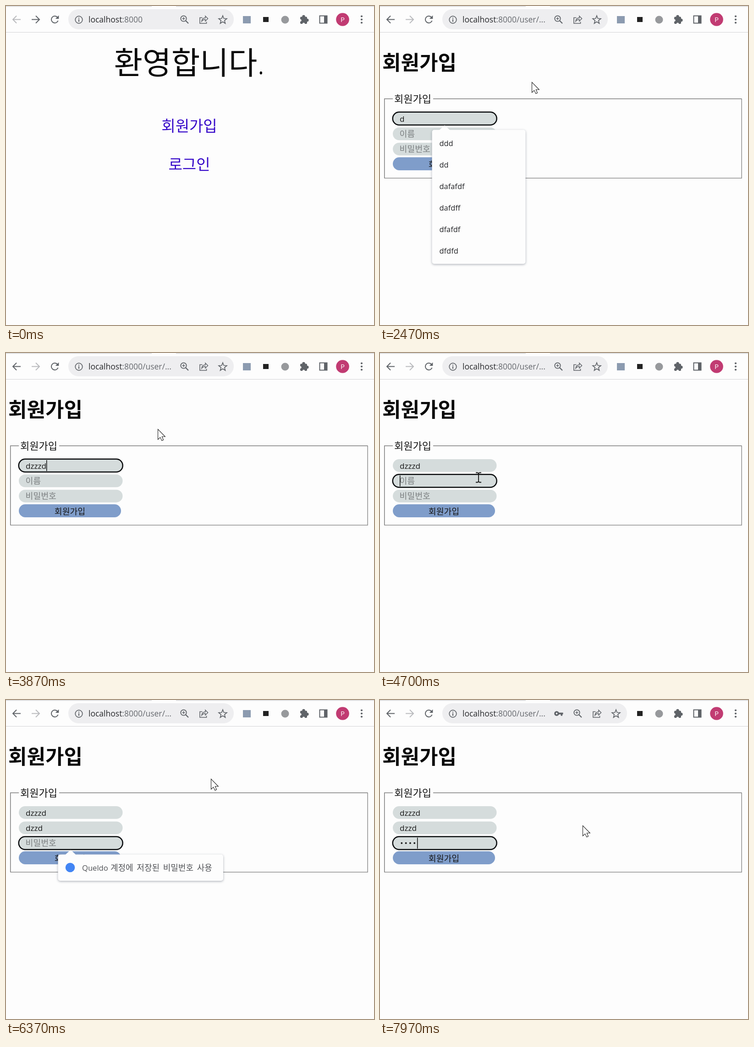
An HTML page with a canvas that plays this animation: 803x697 px, repeating every 8 s.

```html
<!DOCTYPE html>
<html lang="ko">
<head>
<meta charset="utf-8">
<title>회원가입</title>
<style>
  html, body { margin: 0; width: 100%; height: 100%; overflow: hidden; background: #fdfdfd; }
  canvas { display: block; }
</style>
</head>
<body>
<canvas id="stage" width="803" height="697"></canvas>
<script>
const ctx = document.getElementById('stage').getContext('2d');
const LOOP = 8000;
const FONT = '"Open Sans", "Noto Sans CJK KR", "Noto Sans CJK", sans-serif';
const PAPER = '#fdfdfd', ICON = '#5f6368', INK = '#151515';

const NAVIGATE = 600;
const LIST = [1400, 2700];
const ACCOUNT = [5900, 6900];
const fields = [
  { y: 232, hint: '아이디', text: 'dzzzd', focus: 1300, keys: [1850, 2700, 2950, 3200, 3500] },
  { y: 265.5, hint: '이름', text: 'dzzd', focus: 4700, keys: [4850, 5000, 5150, 5300] },
  { y: 298.7, hint: '비밀번호', dots: true, focus: 5800, keys: [6900, 7100, 7300, 7500] }
];
// time, x, y
const pointer = [
  [60, 420, 720], [420, 398, 268], [620, 398, 268], [830, 395, 302],
  [900, 395, 302], [1250, 215, 246], [1400, 215, 246], [1750, 331, 166],
  [4250, 331, 166], [4650, 215, 272], [5350, 215, 272], [5750, 215, 312],
  [5900, 215, 312], [6250, 447, 172], [7300, 447, 172], [7750, 442, 274]
];

const within = (t, [from, to]) => t >= from && t < to;

function text(str, x, y, size, color = INK, weight = 400, align = 'left') {
  ctx.font = `${weight} ${size}px ${FONT}`;
  ctx.textAlign = align;
  ctx.fillStyle = color;
  ctx.fillText(str, x, y);
  return ctx.measureText(str).width;
}

function rect(x, y, w, h, color) {
  ctx.fillStyle = color;
  ctx.fillRect(x, y, w, h);
}

function pill(x, y, w, h, color, r = h / 2) {
  ctx.beginPath();
  ctx.roundRect(x, y, w, h, r);
  ctx.fillStyle = color;
  ctx.fill();
}

function disc(x, y, r, color) {
  ctx.beginPath();
  ctx.arc(x, y, r, 0, 7);
  ctx.fillStyle = color;
  ctx.fill();
}

function ring(x, y, r, width, from = 0, to = Math.PI * 2) {
  ctx.beginPath();
  ctx.arc(x, y, r, from, to);
  ctx.lineWidth = width;
  ctx.strokeStyle = ICON;
  ctx.stroke();
}

// Path given relative to (x, y)
function shape(d, x, y, { fill, stroke, width = 2 }) {
  const path = new Path2D(d);
  ctx.save();
  ctx.translate(x, y);
  if (fill) { ctx.fillStyle = fill; ctx.fill(path); }
  if (stroke) { ctx.strokeStyle = stroke; ctx.lineWidth = width; ctx.stroke(path); }
  ctx.restore();
}

const line = (d, x, y, color = ICON, width = 2) => shape(d, x, y, { stroke: color, width });

function star(x, y) {
  ctx.beginPath();
  for (let i = 0; i < 10; i++) {
    const r = i % 2 ? 4 : 9.3, a = i * Math.PI / 5 - Math.PI / 2;
    ctx.lineTo(x + r * Math.cos(a), y + 1 + r * Math.sin(a));
  }
  ctx.closePath();
  ctx.strokeStyle = ICON;
  ctx.lineWidth = 1.7;
  ctx.stroke();
}

function zoom(x, y) {
  ring(x - 2, y - 2, 6.2, 1.8);
  line('M2.5 2.5L8.5 8.5', x, y, ICON, 2.2);
  line('M-5-2H1M-2-5V1', x, y, ICON, 1.6);
}

function share(x, y) {
  line('M-3-4H-8.5V8.5H6V5', x, y, ICON, 1.6);
  line('M-4.5 4C-4-1-1-3.5 3.5-3.5V-7.5L9-2 3.5 3.5V0C0 0-2.5 1-4.5 4z', x, y, ICON, 1.5);
}

function key(x, y) {
  ring(x - 4.5, y, 3.6, 3.4);
  rect(x, y - 1.9, 9.5, 3.8, ICON);
  rect(x + 4.5, y, 3.5, 5, ICON);
}

function puzzle(x, y) {
  pill(x - 9, y - 6, 15, 15.5, ICON, 2);
  disc(x - 1.5, y - 6.5, 3.2, ICON);
  disc(x + 6.3, y + 1.5, 3.2, ICON);
  disc(x - 9, y + 1.8, 2.6, PAPER);
  disc(x - 1.5, y + 9.5, 2.6, PAPER);
}

function toolbar(onForm, hasKey) {
  rect(0, 0, 803, 57, PAPER);
  rect(0, 0, 318, 1.6, '#dadbde');
  rect(371, 0, 432, 1.6, '#dadbde');
  rect(0, 57, 803, 1, '#d3d3d5');

  const dim = '#b9babd';
  line('M9 0H-7.5M0-8L-8 0 0 8', 23, 29.5, onForm ? ICON : dim);
  line('M-9 0H7.5M0-8L8 0 0 8', 65, 29.5, onForm ? dim : ICON);
  ring(106.5, 29.5, 7.5, 2, 0.35, 5.5);
  shape('M8.8-9V-1.5H1.3z', 106.5, 29.5, { fill: ICON });

  pill(136, 7, hasKey ? 403 : 361, 44, '#eeeef0');
  ring(159, 30, 7.8, 1.7);
  rect(158, 29, 2, 5.5, ICON);
  rect(158, 25.5, 2, 2, ICON);
  const w = text('localhost', 180, 36, 17.5, '#27282b');
  text(onForm ? ':8000/user/...' : ':8000', 180 + w, 36, 17.5, '#66696e');

  const shift = hasKey ? 42 : 0;
  if (hasKey) key(390, 29.5);
  zoom(389.5 + shift, 29.5);
  share(431.5 + shift, 29.5);
  star(473 + shift, 29.5);

  if (!hasKey) rect(517, 22, 17, 16, '#8c9bb0');
  rect(561, 24, 12, 11, '#222');
  disc(609, 30, 8.5, '#97999c');
  puzzle(651, 29.5);
  line('M-8-8H8V8H-8z', 692.5, 29.5);
  rect(694, 21, 7, 17, ICON);
  disc(734.5, 29.5, 14.3, '#c13b72');
  text('P', 734.5, 35, 15, '#fff', 400, 'center');
  for (const y of [22.5, 29.5, 36.5]) disc(776, y, 2.1, ICON);
}

function welcome() {
  text('환영합니다.', 400, 149, 68, '#080808', 350, 'center');
  text('회원가입', 400, 274, 33, '#3507c9', 350, 'center');
  text('로그인', 400, 358, 33, '#3507c9', 350, 'center');
}

function field(f, t, focused) {
  const mid = f.y + 14;
  pill(28, f.y, 226.5, 27.7, '#d5dcdc');
  if (focused) {
    ctx.beginPath();
    ctx.roundRect(27.7, f.y - 0.3, 227, 28.3, 14.1);
    ctx.strokeStyle = '#0a0c0e';
    ctx.lineWidth = 2.5;
    ctx.stroke();
  }

  const count = f.keys.filter(k => t >= k).length;
  let end = 43;
  if (!count) {
    text(f.hint, 42.5, f.y + 20.7, 18.3, '#7b7f80', 350);
  } else if (f.dots) {
    for (let i = 0; i < count; i++) disc(47.3 + i * 9.3, mid, 1.9, INK);
    end = 43.5 + count * 9.3;
  } else {
    end += text(f.text.slice(0, count), 43, f.y + 20.7, 17.1);
  }

  const lastInput = count ? f.keys[count - 1] : f.focus;
  if (focused && (t - lastInput) % 1060 < 530) rect(Math.round(end), mid - 12, 1.4, 24, '#000');
}

function popup(y, w, h) {
  ctx.save();
  ctx.shadowColor = 'rgba(40,50,70,.38)';
  ctx.shadowBlur = 5;
  ctx.shadowOffsetY = 1.5;
  pill(113.5, y, w, h, PAPER, 5);
  ctx.restore();
  shape('M-12 1L0-10 12 1z', 141, y, { fill: PAPER });
}

function suggestions() {
  popup(270.5, 204, 293);
  ['ddd', 'dd', 'dafafdf', 'dafdff', 'dfafdf', 'dfdfd'].forEach((word, i) =>
    text(word, 129.5, 306 + i * 47, 16.4, '#202124'));
}

function accountHint() {
  popup(337.5, 360.5, 57.5);
  disc(140, 366, 10.3, '#4285f4');
  text('Queldo', 166, 372.5, 16.6, '#505256');
  ctx.wordSpacing = '3px';
  text('계정에 저장된 비밀번호 사용', 228, 372.5, 18, '#505256', 350);
  ctx.wordSpacing = '0px';
}

function form(t) {
  text('회원가입', 5, 140, 44, '#080808', 700);

  ctx.lineWidth = 1;
  ctx.strokeStyle = '#c3c3c3';
  ctx.strokeRect(10.5, 203.5, 779, 173);
  ctx.strokeStyle = '#757575';
  ctx.strokeRect(9.5, 202.5, 779.5, 173.5);
  rect(28, 200, 88, 6, PAPER);
  text('회원가입', 31, 211, 22, INK, 350);

  const active = fields.filter(f => t >= f.focus).pop();
  for (const f of fields) field(f, t, f === active);
  pill(28, 330.5, 223, 28.5, '#7f9dca');
  text('회원가입', 139.5, 353, 18.3, INK, 350, 'center');

  if (within(t, LIST)) suggestions();
  if (within(t, ACCOUNT)) accountHint();
}

function pointerAt(t) {
  const next = pointer.findIndex(p => p[0] > t);
  if (next < 0) return pointer[pointer.length - 1].slice(1);
  if (next === 0) return pointer[0].slice(1);
  const [t0, x0, y0] = pointer[next - 1], [t1, x1, y1] = pointer[next];
  const u = (t - t0) / (t1 - t0), s = u * u * (3 - 2 * u);
  return [x0 + (x1 - x0) * s, y0 + (y1 - y0) * s];
}

function cursor(t, onForm) {
  const [x, y] = pointerAt(t).map(Math.round);
  const overField = onForm && x > 28 && x < 254 && y > 232 && y < 327;
  if (overField) {
    line('M-6-10.5H-2L0-9 2-10.5H6M0-9V9M-6 10.5H-2L0 9 2 10.5H6', x, y, '#111', 1.8);
  } else {
    shape('M0 0V22.5L5 17.8 8.6 25 12 23.3 8.8 16.3H15.8z', x + 0.5, y + 0.5,
      { fill: '#fff', stroke: '#222', width: 1.1 });
  }
}

function draw(t) {
  const onForm = t >= NAVIGATE;
  rect(0, 0, 803, 697, PAPER);
  toolbar(onForm, t >= fields[2].keys[0]);
  if (onForm) form(t); else welcome();
  cursor(t, onForm);
}

const start = performance.now();
function tick() {
  draw((performance.now() - start) % LOOP);
  requestAnimationFrame(tick);
}
tick();
</script>
</body>
</html>
```
